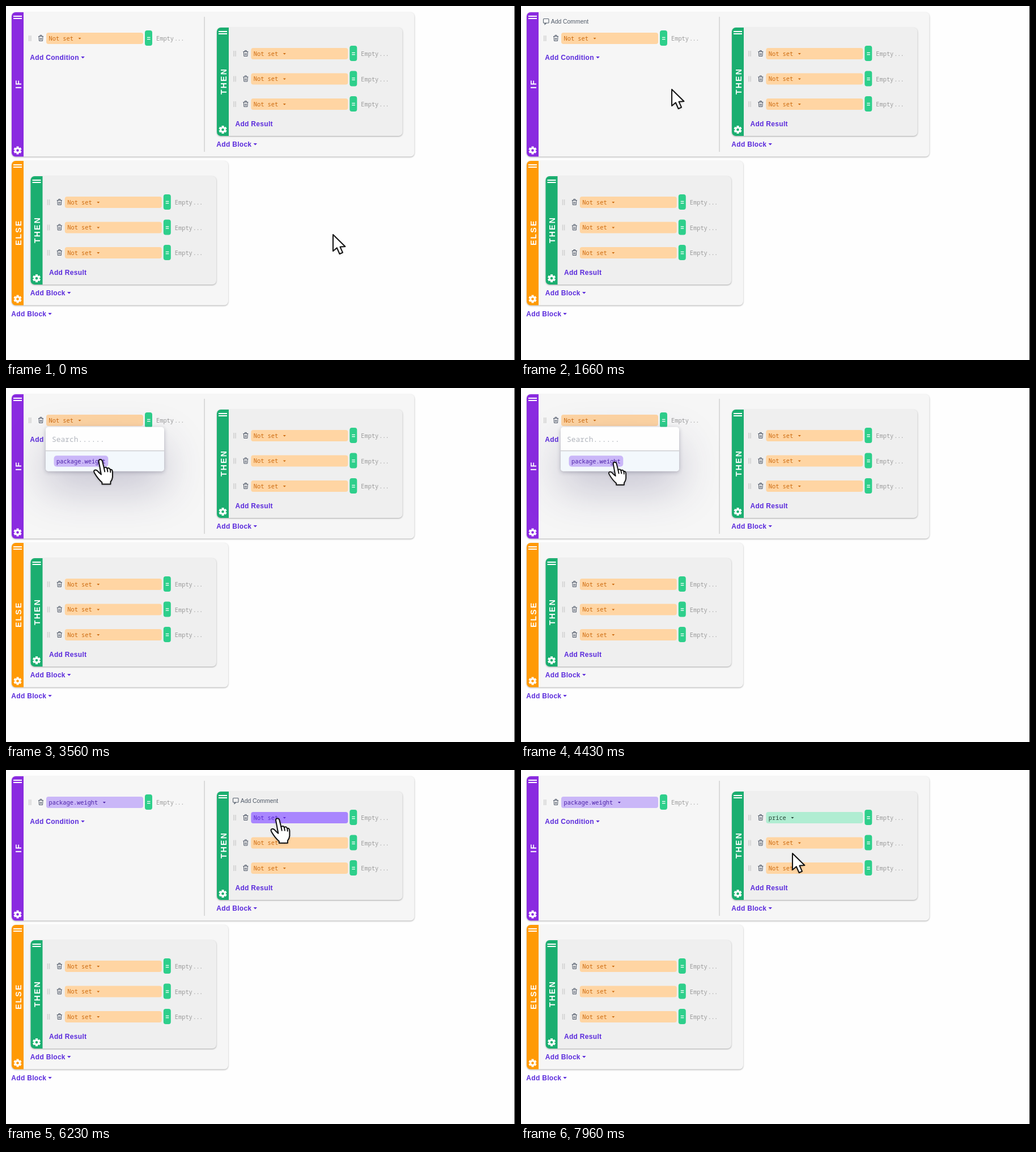
Write an HTML page with a canvas that moves like this. It is 898 by 624 pixels and loops after 8000 ms.

```html
<!DOCTYPE html>
<html lang="en">
<head>
<meta charset="utf-8">
<title>Rule builder</title>
<style>
html, body { margin: 0; width: 100%; height: 100%; overflow: hidden; background: #fefefe; }
canvas { display: block; width: 898px; height: 624px; }
</style>
</head>
<body>
<canvas id="stage" width="898" height="624"></canvas>
<script>
const ctx = document.getElementById('stage').getContext('2d');
const LOOP = 8000;
const MONO = '"Noto Sans Mono", monospace';
const SANS = '"Liberation Sans", Arial, sans-serif';
const CHAR = 6.2;
const LINK = '#5b2bdc';

// Bar styles: fill and text as RGB
const UNSET = { fill: [255, 213, 163], ink: [205, 106, 14] };
const HOVER = { fill: [169, 134, 254], ink: [88, 40, 210] };
const FIELD = { fill: [202, 183, 248], ink: [76, 34, 168] };
const RESULT = { fill: [176, 237, 210], ink: [38, 70, 56] };

const MOVE_TIME = 835;
const START = [576, 402];
const MOVES = [
  [725, 291, 181],
  [1565, 206.5, 67],
  [3025, 175, 132],
  [5525, 490, 88],
  [6995, 478, 146]
];
const HAND_TIMES = [[2080, 3040], [3285, 4450], [5900, 7010], [7420, 7830]];
const PRESS_TIMES = [[2430, 2600], [4330, 4450], [6400, 6630]];

const within = (t, [a, b]) => t >= a && t < b;
const ramp = (t, a, b) => {
  const p = Math.min(1, Math.max(0, (t - a) / (b - a)));
  return p * p * (3 - 2 * p);
};
const mix = (a, b, p) => a.map((v, i) => v + (b[i] - v) * p);
const blend = (a, b, p) => ({ fill: mix(a.fill, b.fill, p), ink: mix(a.ink, b.ink, p) });
const rgb = c => `rgb(${c.map(Math.round).join(',')})`;

function box(x, y, w, h, r, fill) {
  ctx.beginPath();
  ctx.roundRect(x, y, w, h, r);
  ctx.fillStyle = fill;
  ctx.fill();
}

function shadow(color, blur, dy) {
  ctx.shadowColor = color;
  ctx.shadowBlur = blur;
  ctx.shadowOffsetY = dy;
}

function text(str, x, y, font, color, spacing = 0) {
  ctx.font = font;
  ctx.letterSpacing = spacing + 'px';
  ctx.fillStyle = color;
  ctx.fillText(str, x, y);
}

function caret(x, y, w, color) {
  ctx.beginPath();
  ctx.moveTo(x, y);
  ctx.lineTo(x + w, y);
  ctx.lineTo(x + w / 2, y + w / 2 + 0.3);
  ctx.fillStyle = color;
  ctx.fill();
}

function link(str, x, y, caretX) {
  text(str, x, y + 4, 'bold 12px ' + SANS, LINK, 0.3);
  if (caretX) caret(caretX, y - 2, 6.5, LINK);
}

function gear(x, y, hole) {
  ctx.save();
  ctx.translate(x, y);
  ctx.fillStyle = '#fff';
  for (let i = 0; i < 6; i++) {
    ctx.rotate(Math.PI / 3);
    ctx.fillRect(-2, -7, 4, 5);
  }
  ctx.beginPath();
  ctx.arc(0, 0, 5.2, 0, 7);
  ctx.fill();
  ctx.beginPath();
  ctx.arc(0, 0, 2.3, 0, 7);
  ctx.fillStyle = hole;
  ctx.fill();
  ctx.restore();
}

function card(x, y, w, h, fill, color, label) {
  ctx.save();
  shadow('rgba(0,0,0,0.32)', 2.5, 1);
  box(x, y, w, h, 7, fill);
  ctx.restore();
  box(x, y, 21, h, [7, 0, 0, 7], color);
  ctx.fillStyle = '#fff';
  ctx.fillRect(x + 3, y + 6, 15, 2);
  ctx.fillRect(x + 3, y + 10, 15, 2);
  gear(x + 10.5, y + h - 11, color);
  ctx.save();
  ctx.translate(x + 11.5, y + h / 2);
  ctx.rotate(-Math.PI / 2);
  ctx.textAlign = 'center';
  text(label, 1, 5, 'bold 14px ' + SANS, '#fff', 2.2);
  ctx.restore();
}

function trash(x, y) {
  ctx.strokeStyle = '#4d5666';
  ctx.lineWidth = 1;
  ctx.beginPath();
  ctx.moveTo(x, y - 3.5);
  ctx.lineTo(x + 9, y - 3.5);
  ctx.moveTo(x + 3, y - 4);
  ctx.lineTo(x + 3, y - 5.5);
  ctx.lineTo(x + 6, y - 5.5);
  ctx.lineTo(x + 6, y - 4);
  ctx.moveTo(x + 1, y - 3.5);
  ctx.lineTo(x + 1.5, y + 4.5);
  ctx.lineTo(x + 7.5, y + 4.5);
  ctx.lineTo(x + 8, y - 3.5);
  ctx.moveTo(x + 3.5, y - 1);
  ctx.lineTo(x + 3.5, y + 3);
  ctx.moveTo(x + 5.5, y - 1);
  ctx.lineTo(x + 5.5, y + 3);
  ctx.stroke();
}

// x is the left edge of the bar, y the middle of the row
function row(x, y, label = 'Not set', style = UNSET) {
  const ink = rgb(style.ink);
  ctx.fillStyle = '#cfcfcf';
  ctx.fillRect(x - 31, y - 5, 1.5, 10);
  ctx.fillRect(x - 28, y - 5, 1.5, 10);
  trash(x - 14, y);
  box(x, y - 10, 171, 20, 4, rgb(style.fill));
  text(label, x + 4.5, y + 3.5, '500 10.33px ' + MONO, ink);
  caret(x + 56.5 + (label.length - 7) * CHAR, y - 1, 5, ink);
  box(x + 174, y - 14, 13, 27, 4, '#2ecf8b');
  ctx.fillStyle = '#fff';
  ctx.fillRect(x + 178, y - 2.2, 5.5, 1.3);
  ctx.fillRect(x + 178, y + 1, 5.5, 1.3);
  text('Empty', x + 194, y + 4, '10.33px ' + MONO, '#9b9b9b');
  text('...', x + 226, y + 4, '10.33px ' + MONO, '#9b9b9b', -0.6);
}

function thenCard(x, y, firstLabel, firstStyle) {
  card(x, y, 327.5, 191, '#efefef', '#1bae70', 'THEN');
  row(x + 60.3, y + 46, firstLabel, firstStyle);
  row(x + 60.3, y + 90.5);
  row(x + 60.3, y + 135);
  link('Add Result', x + 32.5, y + 169.5);
  link('Add Block', x - 0.7, y + 206, x + 64.5);
}

function comment(x, y) {
  ctx.strokeStyle = '#5a6472';
  ctx.lineWidth = 1.1;
  ctx.beginPath();
  ctx.roundRect(x + 0.5, y - 4.5, 9.5, 7.5, 1);
  ctx.moveTo(x + 3, y + 3);
  ctx.lineTo(x + 3, y + 5.5);
  ctx.lineTo(x + 5.8, y + 3);
  ctx.stroke();
  text('Add Comment', x + 13.7, y + 4, '10.4px ' + SANS, '#505a68');
}

function dropdown(x, y, items, style, hovered) {
  const h = 42.5 + items.length * 35.4;
  ctx.save();
  shadow('rgba(55,45,100,0.26)', 75, 32);
  box(x, y, 209, h, 5, '#fff');
  shadow('rgba(40,40,70,0.28)', 7, 2);
  box(x, y, 209, h, 5, '#fefefe');
  ctx.restore();
  text('Search......', x + 11, y + 26, '12.9px ' + MONO, '#b1b5bd');
  if (hovered) box(x, y + 42.5, 209, 35.4, items.length > 1 ? 0 : [0, 0, 5, 5], '#f3f8fc');
  ctx.fillStyle = '#c2c4c8';
  ctx.fillRect(x, y + 41.4, 209, 1.2);
  items.forEach((item, i) => {
    const mid = y + 60.3 + i * 35.4;
    box(x + 14.5, mid - 9.7, item.length * CHAR + 9, 19.4, 5, rgb(style.fill));
    text(item, x + 19, mid + 3.5, '500 10.33px ' + MONO, rgb(style.ink));
  });
}

const ARROW = new Path2D('M1 1 L1 30 L7.8 24.2 L12.6 35 L18 32.6 L13.4 22.6 L22.4 22 Z');
const HAND = new Path2D('M-3.4 3 Q-3.2 0 -.4 0 Q2.2 0 3 3 L6 15 Q9.5 12 11.5 16 ' +
  'Q15 13.5 17 18 Q20.5 16.5 21 22 L21 31 Q20.5 36 17.5 39.5 L17.5 43.5 L2.5 43.5 L2.5 40.5 ' +
  'Q-5 34 -11 23.5 Q-13 19.5 -10 18.7 Q-7 18 -3.5 22.5 L1 26.5 Z');
const KNUCKLES = new Path2D('M6 15 L7.3 21.5 M11.5 16 L12.5 21.5 M17 18 L17.4 22.5');

function cursorAt(t) {
  let [x, y] = START;
  for (const [start, tx, ty] of MOVES) {
    if (t < start + 35) break;
    const left = 1 - Math.min(1, (t - start) / MOVE_TIME);
    const e = 1 - left ** 3;
    x += (tx - x) * e;
    y += (ty - y) * e;
  }
  return [x, y];
}

function cursor(t) {
  const [x, y] = cursorAt(t);
  const hand = HAND_TIMES.some(span => within(t, span));
  const shape = hand ? HAND : ARROW;
  ctx.save();
  ctx.translate(x, y);
  if (hand) {
    ctx.translate(-9.5, -3);
    if (PRESS_TIMES.some(span => within(t, span))) {
      ctx.translate(4, 22);
      ctx.scale(0.92, 0.92);
      ctx.translate(-4, -22);
    }
  }
  ctx.lineJoin = ctx.lineCap = 'round';
  ctx.save();
  shadow('rgba(0,0,0,0.22)', 4, 1);
  ctx.fillStyle = '#fff';
  ctx.fill(shape);
  ctx.restore();
  ctx.strokeStyle = '#111';
  ctx.lineWidth = 2;
  ctx.stroke(shape);
  if (hand) ctx.stroke(KNUCKLES);
  ctx.restore();
}

function conditionStyle(t) {
  if (t >= 4450) return blend(UNSET, FIELD, ramp(t, 4450, 4600));
  return blend(UNSET, HOVER, ramp(t, 2080, 2280) - ramp(t, 3040, 3240));
}

function resultStyle(t) {
  if (t >= 7830) return blend(UNSET, RESULT, ramp(t, 7830, 7960));
  return blend(UNSET, HOVER, ramp(t, 5900, 6100) - ramp(t, 7020, 7400));
}

function draw(t) {
  ctx.fillStyle = '#fefefe';
  ctx.fillRect(0, 0, 898, 624);

  card(10, 11, 710.5, 254.5, '#f6f6f6', '#8a2be0', 'IF');
  ctx.fillStyle = '#d0d0d0';
  ctx.fillRect(349.3, 19, 1.5, 238);
  row(71, 57, t < 4450 ? 'Not set' : 'package.weight', conditionStyle(t));
  link('Add Condition', 42.3, 91, 132.3);
  thenCard(372, 38, t < 7830 ? 'Not set' : 'price', resultStyle(t));

  card(10, 273, 382, 254.5, '#f6f6f6', '#ff9a05', 'ELSE');
  thenCard(43.5, 300);
  link('Add Block', 9.3, 543, 74.3);

  if (within(t, [1070, 3060])) comment(39, 27);
  if (within(t, [5760, 7060])) comment(400, 54);

  if (within(t, [2600, 4600])) {
    ctx.globalAlpha = 1 - ramp(t, 4450, 4600);
    dropdown(70, 68.7, ['package.weight'], FIELD, t >= 3285);
    ctx.globalAlpha = 1;
  }
  if (within(t, [6630, 7830])) {
    dropdown(432, 96.7, ['price', 'currency', 'deliveryInHours'], RESULT, t >= 7420);
  }

  ctx.fillStyle = '#111';
  ctx.fillRect(897, 0, 1, 624);
  cursor(t);
}

const began = performance.now();
function tick() {
  draw((performance.now() - began) % LOOP);
  requestAnimationFrame(tick);
}
tick();
</script>
</body>
</html>
```
